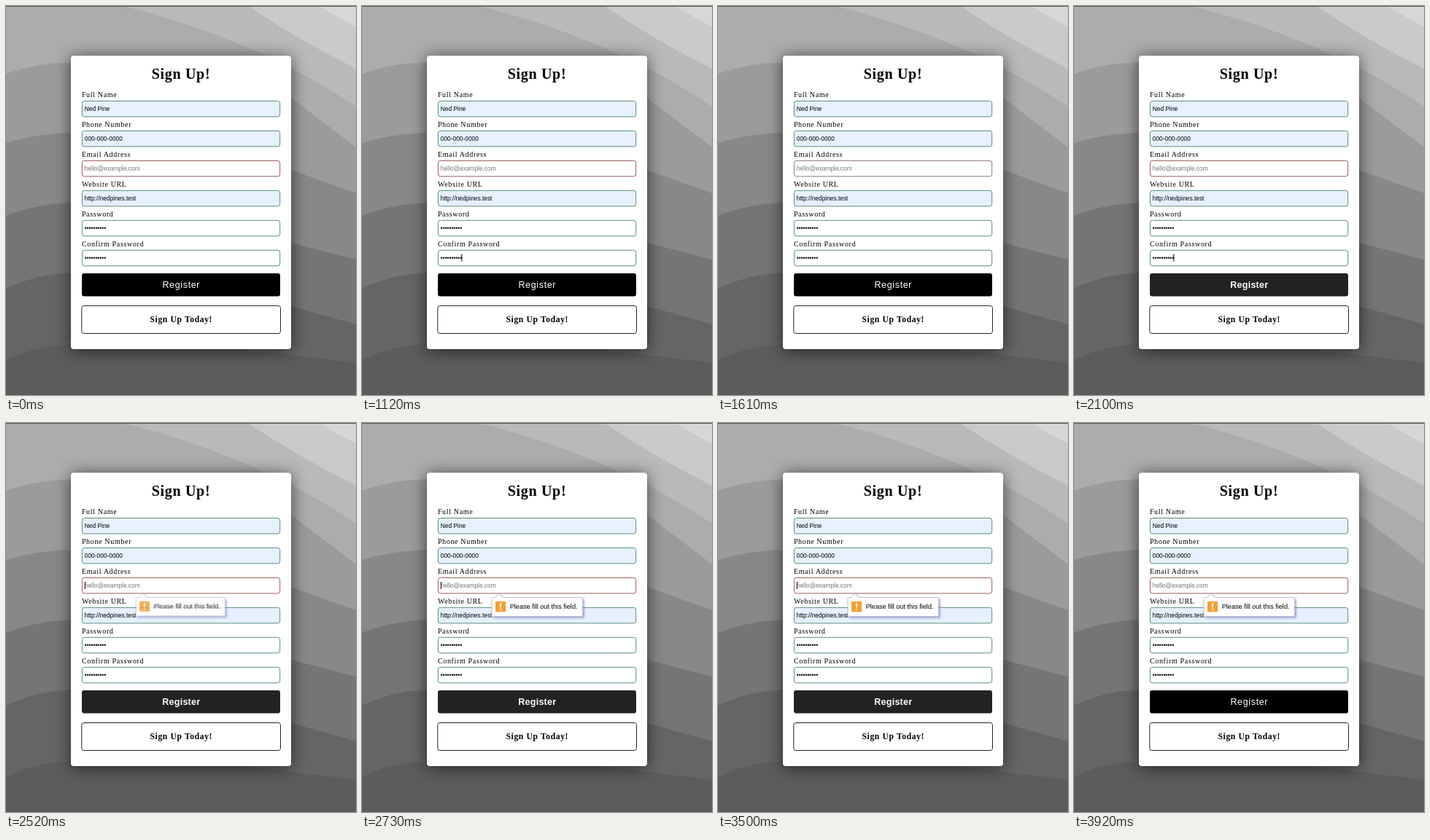
An HTML page that plays this animation: 480 by 534 pixels, repeating every 4.06 s.

```html
<!DOCTYPE html>
<html lang="en">
<head>
<meta charset="utf-8">
<title>Sign Up</title>
<style>
  html, body { margin: 0; width: 100%; height: 100%; overflow: hidden; background: #5b5b5b; }
  svg { display: block; width: 480px; height: 534px; }
  .serif { font-family: "Liberation Serif", "Times New Roman", serif; letter-spacing: .64px; }
  .sans { font-family: "Liberation Sans", Arial, sans-serif; }
  .bold { font-weight: bold; }
  .mid { text-anchor: middle; }
  .label { font-size: 10.05px; }
  .value { font-size: 8.37px; }
  #tip { transform-origin: 188px 234px; }
  #tipBox { filter: drop-shadow(2px 2px 1.5px rgba(70, 70, 160, .45)); }
</style>
</head>
<body>
<svg viewBox="0 0 480 534">
  <defs>
    <filter id="soft" x="-30%" y="-30%" width="160%" height="160%">
      <feGaussianBlur stdDeviation="11"/>
    </filter>
  </defs>
  <rect width="480" height="534" fill="#d7d7d7"/>
  <g id="waves"></g>
  <path d="M0 .5H480" stroke="#555"/>
  <rect x="89" y="70" width="302" height="403" rx="4" opacity=".62" filter="url(#soft)"/>
  <rect x="89" y="68.3" width="302" height="402.7" rx="4" fill="#fff"/>
  <text class="serif bold mid" x="240" y="100" font-size="20.1">Sign Up!</text>
  <g id="fields"></g>

  <rect id="button" x="104" y="367" width="272" height="31.5" rx="3"/>
  <text id="buttonText" class="sans mid" x="240.3" y="387" font-size="12.56" letter-spacing=".63" fill="#fff">Register</text>
  <rect x="103.8" y="411.5" width="272.7" height="38" rx="3" fill="#fff" stroke="#222"/>
  <text class="serif bold mid" x="240.3" y="434" font-size="11.6">Sign Up Today!</text>

  <rect id="confirmCaret" x="136.4" y="340.5" width="1" height="10"/>
  <rect id="emailCaret" x="107.9" y="218" width="1" height="10"/>

  <g id="tip">
    <path id="tipBox" d="M179.5 239.5H182.5L188 234L193.5 239.5H301Q302.5 239.5 302.5 241V264Q302.5 265.5 301 265.5H179.5Q178 265.5 178 264V241Q178 239.5 179.5 239.5Z"
      fill="#fff" stroke="#b4b4b8" stroke-width=".8"/>
    <rect x="183" y="245" width="14.2" height="14.2" rx="1" fill="#f3a034"/>
    <path d="M189 247.3H191.2L190.8 253.7H189.4Z" fill="#fff"/>
    <circle cx="190.1" cy="256" r="1.1" fill="#fff"/>
    <text class="sans" x="202.7" y="255.2" font-size="9.15">Please fill out this field.</text>
  </g>
</svg>
<script>
const DURATION = 4060;
const $ = id => document.getElementById(id);

// Each wave: height at the left edge, at the crest, at x = 391 and at the right edge.
const wave = (left, crest, mid, right) =>
  `M0 ${left}Q45 ${crest} 100 ${crest}C230 ${crest} 310 ${mid - (right - mid) * .9} 391 ${mid}L480 ${right}`;
const layers = [
  ['M0 0H430Q455 16 480 28', '#cacaca'],
  ['M0 0H332Q400 46 480 86', '#b9b9b9'],
  ['M0 0H160Q345 46 480 138', '#acacac'],
  [wave(93, 77, 126, 194), '#9b9b9b'],
  [wave(188, 174, 225, 257), '#888'],
  [wave(288, 270, 325, 348), '#757575'],
  [wave(388, 366, 412, 437), '#656565'],
  [wave(486, 464, 479, 490), '#5c5c5c']
];
$('waves').innerHTML = layers
  .map(([edge, fill]) => `<path d="${edge}V534H0Z" fill="${fill}"/>`).join('');

const AUTOFILL = '#e7f0fe', GREEN = '#56917b', RED = '#9c5a56';
const dots = '•'.repeat(10);
const fields = [
  ['Full Name', 'Ned Pine', AUTOFILL],
  ['Phone Number', '000-000-0000', AUTOFILL],
  ['Email Address', 'hello@example.com', '#fff', 'email'],
  ['Website URL', 'http://nedpines.test', AUTOFILL],
  ['Password', dots, '#fff'],
  ['Confirm Password', dots, '#fff']
];
$('fields').innerHTML = fields.map(([label, value, fill, id = ''], i) => {
  const y = 130.5 + i * 40.95;
  return `<text class="serif label" x="103.9" y="${y - 5.3}">${label}</text>
    <rect id="${id}" x="104.4" y="${y}" width="271.3" height="21.5" rx="3" fill="${fill}" stroke="${id ? RED : GREEN}"/>
    <text class="sans value" x="107.8" y="${y + 13.7}" fill="${id ? '#757575' : '#000'}">${value}</text>`;
}).join('');

// Hard steps: [time in ms, properties], the first at 0.
function play(id, steps) {
  const frames = steps.map(([ms, props]) => ({ offset: ms / DURATION, easing: 'step-end', ...props }));
  frames.push({ ...frames[frames.length - 1], offset: 1 });
  $(id).animate(frames, { duration: DURATION, iterations: Infinity });
}
const blink = (id, times) =>
  play(id, [0, ...times].map((ms, i) => [ms, { opacity: i % 2 }]));

blink('confirmCaret', [1120, 1610, 2100, 2240]);
blink('emailCaret', [2240, 2940, 3430, 3920]);

play('email', [[0, { stroke: RED }], [1470, { stroke: '#8d7772' }], [1750, { stroke: RED }]]);

play('button', [
  [0, '#000'], [1750, '#0c0c0c'], [1820, '#181818'], [1890, '#222'],
  [3570, '#161616'], [3640, '#0a0a0a'], [3710, '#000']
].map(([ms, fill]) => [ms, { fill }]));

const plain = { fontWeight: 400, letterSpacing: '.63px' };
const hover = { fontWeight: 700, letterSpacing: '.25px' };
play('buttonText', [[0, plain], [1750, hover], [3570, plain]]);

play('tip', [
  [0, 0, .9], [2450, .4, .93], [2520, .82, .982], [2590, .95, .996], [2660, 1, 1]
].map(([ms, opacity, size]) => [ms, { opacity, transform: `scale(${size})` }]));
</script>
</body>
</html>
```
